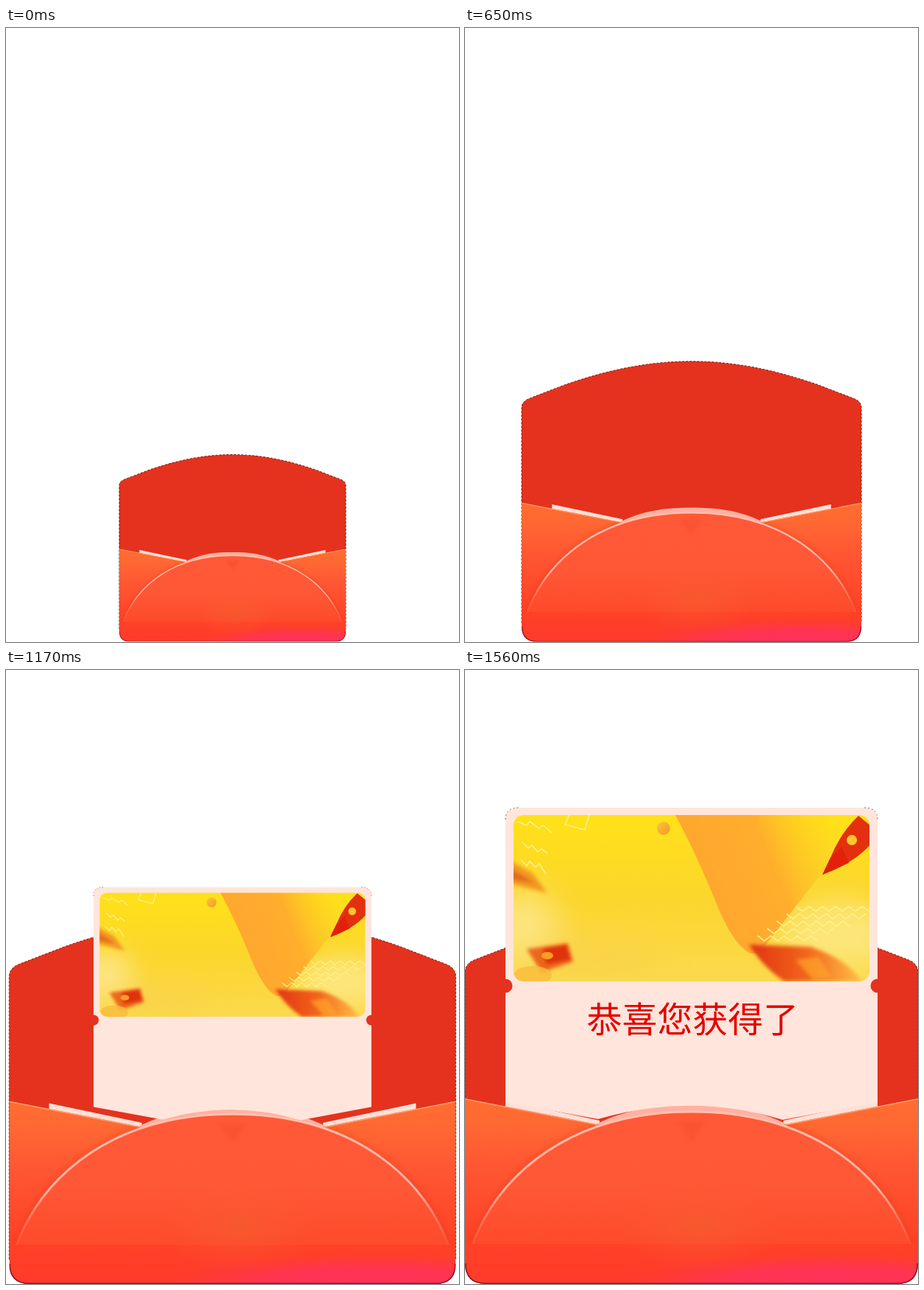
An HTML page that plays this animation: 616x834 px, repeating every 1.82 s.

```html
<!DOCTYPE html>
<html lang="zh-CN">
<head>
<meta charset="utf-8">
<title>Red envelope</title>
<style>
html, body { margin: 0; width: 100%; height: 100%; overflow: hidden; background: #fff; }
svg { display: block; width: 616px; height: 834px; }
text { font-family: "Noto Sans CJK SC", "Noto Sans CJK", sans-serif; }
</style>
</head>
<body>
<svg viewBox="0 0 616 834">
  <defs>
    <linearGradient id="pocketFill" x1="0" y1="582" x2="0" y2="833" gradientUnits="userSpaceOnUse">
      <stop offset="0" stop-color="#ff6d31"/>
      <stop offset=".14" stop-color="#ff6832"/>
      <stop offset=".36" stop-color="#ff5733"/>
      <stop offset=".75" stop-color="#fe4327"/>
      <stop offset="1" stop-color="#ff3a2a"/>
    </linearGradient>
    <linearGradient id="flapFill" x1="0" y1="600" x2="0" y2="781" gradientUnits="userSpaceOnUse">
      <stop offset="0" stop-color="#ff5937"/>
      <stop offset=".55" stop-color="#ff5836"/>
      <stop offset="1" stop-color="#fd4a2b"/>
    </linearGradient>
    <linearGradient id="rim" x1="0" y1="597" x2="0" y2="780" gradientUnits="userSpaceOnUse">
      <stop offset="0" stop-color="#ffc0b0"/>
      <stop offset=".6" stop-color="#ffb09c"/>
      <stop offset="1" stop-color="#ff6a4a" stop-opacity=".3"/>
    </linearGradient>
    <radialGradient id="pink" cx="0" cy="0" r="1" gradientUnits="userSpaceOnUse"
      gradientTransform="translate(500 835) scale(290 44)">
      <stop offset="0" stop-color="#ff3060"/>
      <stop offset=".55" stop-color="#ff3356" stop-opacity=".85"/>
      <stop offset="1" stop-color="#ff3a40" stop-opacity="0"/>
    </radialGradient>
    <radialGradient id="warm">
      <stop offset="0" stop-color="#f2602c" stop-opacity=".55"/>
      <stop offset="1" stop-color="#ff5a36" stop-opacity="0"/>
    </radialGradient>
    <linearGradient id="sun" x1="0" y1="0" x2="0" y2="1">
      <stop offset="0" stop-color="#ffe118"/>
      <stop offset=".5" stop-color="#fbd62c"/>
      <stop offset="1" stop-color="#fbd94e"/>
    </linearGradient>
    <linearGradient id="ribbon" x1="330" y1="320" x2="520" y2="245" gradientUnits="userSpaceOnUse">
      <stop offset="0" stop-color="#ffa62f"/>
      <stop offset=".5" stop-color="#ffae2c"/>
      <stop offset="1" stop-color="#fcd21e" stop-opacity="0"/>
    </linearGradient>
    <linearGradient id="red" x1="0" y1="0" x2="1" y2="0">
      <stop offset="0" stop-color="#e03410"/>
      <stop offset=".5" stop-color="#f2641c"/>
      <stop offset="1" stop-color="#ffc048"/>
    </linearGradient>
    <linearGradient id="gold" x1="0" y1="0" x2="1" y2="1">
      <stop offset="0" stop-color="#fbc33c"/>
      <stop offset="1" stop-color="#f59a22"/>
    </linearGradient>
    <filter id="soft" x="-50%" y="-50%" width="200%" height="200%"><feGaussianBlur stdDeviation="2.5"/></filter>
    <filter id="haze" x="-50%" y="-50%" width="200%" height="200%"><feGaussianBlur stdDeviation="22"/></filter>
    <clipPath id="picture"><rect x="66" y="197" width="484" height="226" rx="14"/></clipPath>
    <clipPath id="pocketShape"><path d="M0 582L185 618Q308 590 431 618L616 582V806Q616 834 588 834H28Q0 834 0 806Z"/></clipPath>

    <g id="face">
      <circle r="50" fill="#f3c638" stroke="#a9841c" stroke-width="2" stroke-dasharray="6 4"/>
      <circle cx="2" cy="-1" r="45" fill="#f8d54c"/>
      <circle cx="2" r="33" fill="url(#gold)"/>
      <path d="M-14-21L2 0L18-21M2 0V23M-14 2H18M-14 12H18" fill="none" stroke="#ffee3c" stroke-width="7"/>
    </g>
    <g id="edge">
      <path d="M-50-6V7A50 14 0 0 0 50 7V-6Z" fill="#fb8d1c"/>
      <path d="M-50 2V7A50 14 0 0 0 50 7V2A50 14 0 0 1-50 2Z" fill="#ee8a1e"/>
      <ellipse cy="-6" rx="50" ry="14" fill="#fbcc48"/>
      <ellipse cy="-7" rx="31" ry="9" fill="url(#gold)"/>
      <path d="M-50-6A50 14 0 0 1 50-6V7A50 14 0 0 1-50 7Z" fill="none" stroke="#8a6a1c" stroke-width="2" stroke-dasharray="6 4"/>
    </g>
    <path id="arc" d="M10 780C48 682 146 600 308 600S568 682 606 780"/>
  </defs>

  <g id="coins"></g>

  <g class="envelope">
    <path d="M0 800V411Q0 398 15 393C25 389 54 378 80 368C150 344 225 326 308 326S466 344 536 368C562 378 591 389 601 393Q616 398 616 411V800Z"
      fill="#e4321e" stroke="#7c1a10" stroke-width="1" stroke-dasharray="3 2" vector-effect="non-scaling-stroke"/>
    <path d="M55 585L183 612V622L55 596ZM561 585L433 612V622L561 596Z" fill="#ffe0d6"/>
    <path d="M176 618C222 595 264 591 308 591S394 595 440 618Z" fill="#ffb1a1"/>
  </g>

  <g id="card">
    <path d="M55 587V205Q55 187 73 187H543Q561 187 561 205V587L432 611Q308 573 181 610Z" fill="#ffe5db"/>
    <path d="M55 203Q55 187 73 187M543 187Q561 187 561 203" fill="none" stroke="#8a5a50" stroke-dasharray="2 3"/>
    <g clip-path="url(#picture)">
      <rect x="66" y="197" width="484" height="226" fill="url(#sun)"/>
      <g filter="url(#haze)">
        <ellipse cx="80" cy="350" rx="45" ry="50" fill="#fde582"/>
        <ellipse cx="510" cy="360" rx="80" ry="45" fill="#fde67c"/>
        <ellipse cx="170" cy="390" rx="90" ry="22" fill="#f9d24a"/>
      </g>
      <path d="M286 197H515L490 270Q450 320 400 385H388Q367 375 345 325Q315 250 286 197Z" fill="url(#ribbon)"/>
      <g filter="url(#soft)">
        <path d="M60 258L92 276L112 303L60 290Z" fill="#f39a24"/>
        <path d="M60 268L96 290L60 284Z" fill="#e26a1c"/>
        <path d="M84 379L140 371L147 396L104 411Z" fill="#ec661f"/>
        <path d="M106 378L138 373L144 394L110 400Z" fill="#e0300f"/>
        <path d="M386 373L470 376Q518 392 540 423H434Q406 404 386 373Z" fill="url(#red)"/>
        <path d="M450 394L480 390L498 418L474 420Z" fill="#ffa52b" opacity=".7"/>
      </g>
      <path d="M535 198Q510 222 497 255L486 278Q530 262 552 236V212Z" fill="#e4300f"/>
      <path d="M497 255L512 240L522 262L486 278Z" fill="#e3200b"/>
      <circle cx="526" cy="231" r="7" fill="#ffc62e"/>
      <ellipse cx="112" cy="388" rx="8" ry="5" fill="#ff9c25"/>
      <ellipse cx="92" cy="415" rx="26" ry="13" fill="#f9bd3c" opacity=".8"/>
      <circle cx="270" cy="215" r="9" fill="url(#gold)"/>
      <g id="lines" fill="none" stroke="#fff08a" stroke-width="1.6">
        <path d="M145 190L136 210L163 217L171 190M72 206L84 211L88 206L101 215L106 211L118 221M78 234L86 242L91 238L99 247L104 243L112 249M76 258L84 266L88 260L96 268L101 263L110 277"/>
      </g>
    </g>
    <circle cx="55" cy="429" r="9.5" fill="#e4321e"/>
    <circle cx="561" cy="429" r="9.5" fill="#e4321e"/>
  </g>
  <text id="label" x="0.5" y="19" font-size="48" text-anchor="middle" fill="#e60000">恭喜您获得了</text>

  <g class="envelope">
    <g clip-path="url(#pocketShape)">
      <path d="M0 580V834H616V580L431 618Q308 600 185 618Z" fill="url(#pocketFill)"/>
      <use href="#arc" fill="none" stroke="#e03a1c" stroke-width="14" opacity=".2" filter="url(#soft)"/>
      <path d="M0 582L185 618M616 582L431 618" stroke="#ff9a6a" stroke-width="3"/>
    </g>
    <use href="#arc" fill="url(#flapFill)"/>
    <use href="#arc" fill="none" stroke="url(#rim)" stroke-width="3"/>
    <path d="M288 613H328L308 640Z" fill="#f24a2c" opacity=".35" filter="url(#soft)"/>
    <ellipse cx="318" cy="755" rx="110" ry="62" fill="url(#warm)"/>
    <g clip-path="url(#pocketShape)">
      <rect x="190" y="785" width="430" height="50" fill="url(#pink)"/>
      <path d="M0 806Q0 834 28 834H588Q616 834 616 806" fill="none" stroke="#8e1526" stroke-width="3"/>
    </g>
  </g>
</svg>
<script>
const TICK = 130, LOOP = 1820;
const $ = id => document.getElementById(id);
const envelope = document.querySelectorAll('.envelope');
const scaleAt = (x, y, s) => `translate(${x} ${y}) scale(${s}) translate(${-x} ${-y})`;
const mix = (a, b, u) => a + (b - a) * u;
const clamp = v => Math.min(1, Math.max(0, v));
const smooth = v => v * v * (3 - 2 * v);

// early x, y, diameter; late x, y, diameter; tilt of coins seen edge-on
const coins = [
  [326, 173, 10, 330, 223, 28, 38],
  [346, 180, 7, 345, 180, 20, -52],
  [344, 213, 17, 367, 285, 43, -52],
  [284, 251, 23, 244, 351, 42, 38],
  [275, 268, 26, 200, 478, 66, 0],
  [359, 274, 27, 406, 412, 60, -52],
  [313, 358, 32, 295, 570, 60, -52],
  [224, 452, 28, 150, 690, 50, -52],
  [314, 521, 30, 300, 790, 55, 40],
  [376, 556, 30, 410, 840, 55, -52],
  [330, 261, 20, 318, 372, 37],
  [347, 258, 17, 366, 457, 42],
  [244, 339, 37, 109, 638, 82],
  [399, 331, 28, 503, 725, 60],
  [434, 451, 36, 478, 780, 60]
];

const NS = 'http://www.w3.org/2000/svg';
const add = (parent, name, attrs) => {
  const el = document.createElementNS(NS, name);
  for (const key in attrs) el.setAttribute(key, attrs[key]);
  return parent.appendChild(el);
};
const coinEls = coins.map(c => add($('coins'), 'use', { href: c.length > 6 ? '#edge' : '#face' }));

// rows of zigzags on the ticket
for (let row = 0; row < 5; row++) {
  let d = '';
  for (let i = 0; i < 14 - row; i++) {
    const x = 450 - row * 13 + i * 9;
    d += `${i ? 'L' : 'M'}${x} ${321 + row * 10 + (i % 2) * 7}`;
  }
  add($('lines'), 'path', { d });
}

function draw(tick) {
  const size = 0.5 + 0.5 * smooth(clamp(tick / 10));
  envelope.forEach(g => g.setAttribute('transform', scaleAt(308, 833, size)));

  const flying = tick >= 1 && tick <= 4;
  $('coins').style.display = flying ? '' : 'none';
  if (flying) {
    const k = (tick - 2) / 2, u = k * (0.9 + 0.1 * k);
    coins.forEach(([x1, y1, d1, x2, y2, d2, tilt = 0], i) => {
      const d = Math.max(0, mix(d1, d2, u)) / 100;
      coinEls[i].setAttribute('transform',
        `translate(${mix(x1, x2, u)} ${mix(y1, y2, u)}) rotate(${tilt}) scale(${d})`);
    });
  }

  const grow = clamp((tick - 10) / 2);
  const rise = tick < 10 ? mix(0.62, 0.81, (tick - 7) / 3) : mix(0.81, 1, grow);
  $('card').style.display = tick >= 7 ? '' : 'none';
  $('card').setAttribute('transform', scaleAt(308, 613, rise));
  $('label').style.display = tick >= 10 ? '' : 'none';
  $('label').setAttribute('transform', `translate(309 473) scale(${mix(0.5, 1, grow)})`);
}

const start = performance.now();
let shown = -1;
function frame() {
  const tick = Math.floor((performance.now() - start) % LOOP / TICK);
  if (tick !== shown) draw(shown = tick);
  requestAnimationFrame(frame);
}
frame();
</script>
</body>
</html>
```
